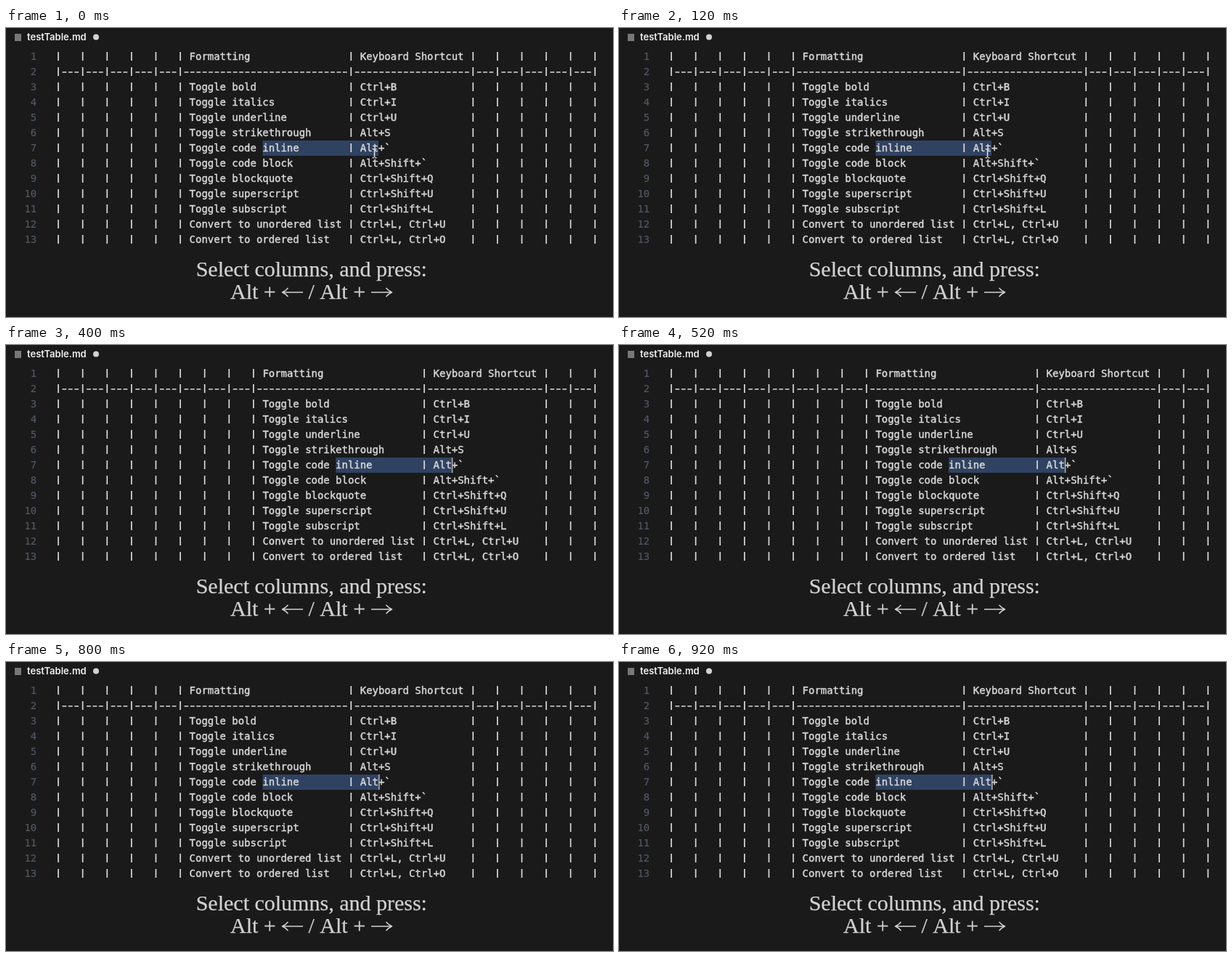
Animation of 836x398 px, one loop 1000 ms. Source, as an HTML page with a canvas:

```html
<!DOCTYPE html>
<html lang="en">
<head>
<meta charset="utf-8">
<title>Move table columns</title>
<style>
html, body { margin: 0; width: 100%; height: 100%; overflow: hidden; background: #1a1a1a; }
canvas { display: block; }
</style>
</head>
<body>
<canvas id="stage" width="836" height="398"></canvas>
<script>
const ctx = document.getElementById('stage').getContext('2d');
const CELL = 8.4, LINE = 21, LEFT = 67.8, TOP = 29;
const EMPTY = 10, WIDE = 28, NARROW = 20, SELECTED = 19, STEP = 200;
const MONO = '13.95px "DejaVu Sans Mono", monospace';
const SERIF = '30px "Liberation Serif", serif';
const INK = '#d8d8d8', CAPTION = '#d2d2d2';

const rows = [
  ['Formatting', 'Keyboard Shortcut'],
  null,
  ['Toggle bold', 'Ctrl+B'],
  ['Toggle italics', 'Ctrl+I'],
  ['Toggle underline', 'Ctrl+U'],
  ['Toggle strikethrough', 'Alt+S'],
  ['Toggle code inline', 'Alt+`'],
  ['Toggle code block', 'Alt+Shift+`'],
  ['Toggle blockquote', 'Ctrl+Shift+Q'],
  ['Toggle superscript', 'Ctrl+Shift+U'],
  ['Toggle subscript', 'Ctrl+Shift+L'],
  ['Convert to unordered list', 'Ctrl+L, Ctrl+U'],
  ['Convert to ordered list', 'Ctrl+L, Ctrl+O']
];

// before: empty columns left of the moved pair; from: first selected cell
const poses = [
  { before: 5, from: 34, pointer: true },
  { before: 7, from: 38 },
  { before: 8, from: 46 },
  { before: 6, from: 38 },
  { before: 5, from: 34 }
];

const cellX = col => LEFT + col * CELL;
const rowY = i => TOP + i * LINE;

function rect(x, y, w, h, color) {
  ctx.fillStyle = color;
  ctx.fillRect(x, y, w, h);
}

// weight adds a thin outline that thickens the letters
function text(str, x, y, font, color, weight = 0, align = 'left') {
  ctx.font = font;
  ctx.fillStyle = ctx.strokeStyle = color;
  ctx.textAlign = align;
  ctx.fillText(str, x, y);
  if (weight) {
    ctx.lineWidth = weight;
    ctx.lineJoin = 'round';
    ctx.strokeText(str, x, y);
  }
}

function pipeColumns(before) {
  const cols = [0];
  let col = 0;
  for (let i = 0; i < EMPTY + 2; i++) {
    col += i === before ? WIDE : i === before + 1 ? NARROW : 4;
    cols.push(col);
  }
  return cols;
}

function drawTitle() {
  rect(12, 8, 9, 10, '#777777');
  text('testTable.md', 29, 17, '600 13px Inter, sans-serif', '#f0f0f0');
  ctx.beginPath();
  ctx.arc(124, 12.5, 4, 0, Math.PI * 2);
  ctx.fillStyle = '#d2d2d2';
  ctx.fill();
}

function drawTable(before) {
  const pipes = pipeColumns(before);
  const last = pipes[pipes.length - 1];
  rows.forEach((row, i) => {
    const y = rowY(i);
    text(String(i + 1), 42.2, y + 15, MONO, '#505761', 0.2, 'right');
    for (const col of pipes) rect(cellX(col) + 3.4, y + 4, 1.7, 12, INK);
    if (row) {
      row.forEach((str, n) => {
        text(str, cellX(pipes[before + n] + 2), y + 15, MONO, INK, 0.45);
      });
      return;
    }
    for (let col = 1; col < last; col++) {
      if (!pipes.includes(col)) rect(cellX(col) + 1.3, y + 10.1, 5.8, 1.5, INK);
    }
  });
}

function drawPointer(x, y) {
  rect(x - 0.8, y - 5, 1.6, 11, '#dddddd');
  for (const end of [y - 6, y + 6]) {
    rect(x - 3, end, 2.4, 1.4, '#dddddd');
    rect(x + 0.6, end, 2.4, 1.4, '#dddddd');
  }
}

function drawArrow(tail, tip, y) {
  const back = tip + Math.sign(tail - tip) * 8;
  ctx.beginPath();
  ctx.moveTo(tail, y);
  ctx.lineTo(tip, y);
  ctx.moveTo(back, y - 6);
  ctx.quadraticCurveTo((back + tip) / 2, y - 1.5, tip, y);
  ctx.quadraticCurveTo((back + tip) / 2, y + 1.5, back, y + 6);
  ctx.strokeStyle = CAPTION;
  ctx.lineWidth = 1.5;
  ctx.stroke();
}

function drawCaption() {
  text('Select columns, and press:', 420.8, 342, SERIF, CAPTION, 0.25, 'center');
  text('Alt +', 309, 373, SERIF, CAPTION, 0.25);
  drawArrow(409, 380.5, 364);
  text('/ Alt +', 416.5, 373, SERIF, CAPTION, 0.25);
  drawArrow(503, 531.5, 364);
}

function draw(now) {
  const pose = poses[Math.floor(now / STEP) % poses.length];
  const end = cellX(pose.from + SELECTED);
  rect(0, 0, 836, 398, '#1a1a1a');
  rect(cellX(pose.from), rowY(6), SELECTED * CELL, LINE, '#2f4262');
  drawTitle();
  drawTable(pose.before);
  if (pose.pointer) drawPointer(507.5, 172);
  else rect(end, rowY(6), 1.6, LINE, '#aeb0b0');
  drawCaption();
}

const start = performance.now();
function tick() {
  draw(performance.now() - start);
  requestAnimationFrame(tick);
}
tick();
</script>
</body>
</html>
```
